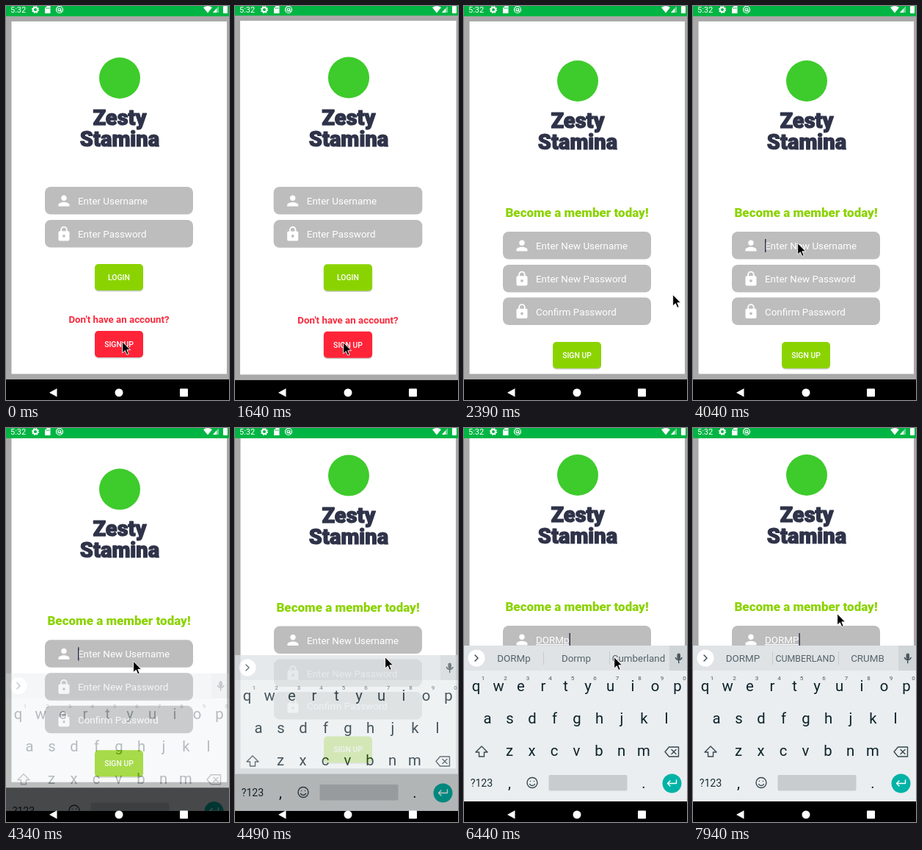
An HTML page that plays this animation: 304 px wide and 536 px high, repeating every 8000 ms.

```html
<!DOCTYPE html>
<html lang="en">
<head>
<meta charset="utf-8">
<title>Sign up</title>
<style>
html, body { margin: 0; width: 100%; height: 100%; overflow: hidden; background: #000; }
svg { display: block; width: 304px; height: 536px; font-family: Roboto, sans-serif; }
.mid { text-anchor: middle; }
.brand { font-weight: 900; font-size: 29px; fill: #2f3349; stroke: #2f3349; stroke-width: 1.2; stroke-linejoin: round; }
.hint { font-size: 13.4px; fill: #fff; }
.btn { font-size: 10.4px; font-weight: 500; fill: #fff; }
.key { font-size: 20.3px; fill: #0c2129; }
.num { font-size: 8px; fill: #4b575d; }
.word { font-size: 13.4px; fill: #55636a; }
.line { fill: none; stroke: #37474f; stroke-width: 1.4; stroke-linejoin: round; stroke-linecap: round; }
#typed { text-decoration: underline; }
</style>
</head>
<body>
<svg viewBox="0 0 304 536">
  <defs>
    <clipPath id="aboveNav"><path d="M0 0H304V521H0z"/></clipPath>
    <path id="person" fill="#fff" d="M12 12c2.2 0 4-1.8 4-4s-1.8-4-4-4-4 1.8-4 4 1.8 4 4 4zm0 2c-2.7 0-8 1.3-8 4v2h16v-2c0-2.7-5.3-4-8-4z"/>
    <path id="lock" fill="#fff" fill-rule="evenodd" d="M18 8h-1V6A5 5 0 0 0 7 6v2H6a2 2 0 0 0-2 2v10a2 2 0 0 0 2 2h12a2 2 0 0 0 2-2V10a2 2 0 0 0-2-2zm-6 9a2 2 0 1 1 0-4 2 2 0 0 1 0 4zm3-9H9V6a3 3 0 0 1 6 0z"/>
  </defs>

  <rect width="304" height="536"/>
  <rect width="304" height="14" fill="#00b544"/>
  <g id="login"></g>
  <g id="signup"></g>
  <g clip-path="url(#aboveNav)"><g id="keyboard"></g></g>

  <rect id="bar" width="304" height="14" fill="#00b544"/>
  <g fill="#fff">
    <text x="6" y="9" font-size="11">5:32</text>
    <circle cx="40" cy="5" r="3" fill="none" stroke="#fff" stroke-width="2"/>
    <circle cx="40" cy="5" r="4.4" fill="none" stroke="#fff" stroke-width="1.4" stroke-dasharray="1.8 1.65"/>
    <path d="M53 3l3-3h4.5V10H53z"/>
    <path d="M55.5 2v2M57.2 2v2M59 2v2" stroke="#00b544" stroke-width=".8"/>
    <circle cx="73" cy="5" r="4.5" fill="none" stroke="#fff" stroke-width="1.2"/>
    <circle cx="73" cy="5" r="2" fill="none" stroke="#fff" stroke-width="1.2"/>
    <path d="M73 5l3 3" stroke="#fff" stroke-width="1.2"/>
    <path d="M269 2Q275-2 281 2L275 9.5z"/>
    <path d="M290 0V9H282z" fill-opacity=".45"/>
    <path d="M287 3.5V9H282z"/>
    <rect x="296" width="6" height="10" rx="1"/>
    <path d="M59 526l10.500-5.700v11.400z"/>
    <circle cx="154" cy="526" r="5.500"/>
    <rect x="237" y="520.500" width="11" height="11" rx="1"/>
  </g>
  <path id="cursor" d="M.7 .7V16L4.300 12.700 6.800 18.400 9.200 17.400 6.800 11.800H11.500z" stroke="#fff" stroke-width=".9"/>
</svg>

<script>
const $ = id => document.getElementById(id);
const text = (x, y, cls, s, more = '') => `<text x="${x}" y="${y}" class="${cls}" ${more}>${s}</text>`;
const rect = (x, y, w, h, r, fill) => `<rect x="${x}" y="${y}" width="${w}" height="${h}" rx="${r}" fill="${fill}"/>`;
const icon = (id, x, y) => `<use href="#${id}" transform="translate(${x - 11.3} ${y - 11.3}) scale(.94)"/>`;

const page = body => rect(0, 14, 304, 494, 0, '#a9a9a9') + rect(7.5, 21, 293.5, 479.5, 0, '#fff') + body;
const brand = dy => `<circle cx="155" cy="${98 + dy}" r="28" fill="#3ecb2c"/>` +
  text(155, 162 + dy, 'brand mid', 'Zesty') + text(155, 191 + dy, 'brand mid', 'Stamina');
const field = (y, pic, hint, more) => rect(53, y, 202, 37.5, 8, '#bdbdbd') +
  icon(pic, 79, y + 19) + text(98, y + 24, 'hint', hint, more);
const button = (y, fill, label) => rect(121, y + 1.5, 66, 36, 5, '#0003') + rect(121, y, 66, 36, 5, fill) +
  text(154, y + 21.8, 'btn mid', label);

$('login').innerHTML = page(
  brand(0) + field(246, 'person', 'Enter Username') + field(291, 'lock', 'Enter Password') +
  button(351, '#8bd300', 'LOGIN') +
  text(154, 431, 'mid', "Don't have an account?", 'font-size="13.3" font-weight="700" fill="#f9293c"') +
  button(442, '#ff2438', 'SIGN UP'));

$('signup').innerHTML = page(
  brand(4) +
  text(154, 287, 'mid', 'Become a member today!', 'font-size="17" font-weight="900" fill="#8bd300"') +
  field(307, 'person', 'Enter New Username', 'id="userHint"') + field(352, 'lock', 'Enter New Password') +
  field(396.5, 'lock', 'Confirm Password') + button(457, '#8bd300', 'SIGN UP') +
  text(98, 331, 'hint', '', 'id="typed"') + '<rect id="caret" y="317" width="1.5" height="18" fill="#30344e"/>');

const row = (letters, x, y) => [...letters].map((c, i) => text(x + 30.5 * i, y, 'key mid', c)).join('');
$('keyboard').innerHTML =
  rect(0, 296, 304, 212, 0, '#eaeef0') + rect(0, 296, 304, 34, 0, '#dfe3e6') + rect(280, 296, 24, 34, 0, '#d0d5d8') +
  '<circle cx="17" cy="313" r="11.5" fill="#fff"/><path id="chevron" class="line"/>' +
  '<path id="dividers" d="M108.5 304v18M198.5 304v18" stroke="#c5cacd"/>' +
  [68, 153, 238].map(x => text(x, 318, 'word mid', '')).join('') +
  rect(290.5, 306.5, 4.5, 8.5, 2.2, '#4b575d') + '<path class="line" d="M288.500 312.500a4.500 4.500 0 0 0 8.500 0M292.700 317v2.500"/>' +
  row('qwertyuiop', 16.5, 358) + row('asdfghjkl', 32, 402) + row('zxcvbnm', 62, 446) +
  [...'1234567890'].map((c, i) => text(26 + 30.5 * i, 343, 'num mid', c)).join('') +
  '<path class="line" d="M24 433l-8 8h4.500v6h7v-6h4.500z"/>' +
  '<path class="line" d="M274 440.500l5.500-6.500h13v13h-13zM283 437.500l6 6M289 437.500l-6 6"/>' +
  text(24, 488, 'mid', '?123', 'font-size="14.2" fill="#1c2f37"') +
  text(62, 490, 'key mid', ',') + text(245, 490, 'key mid', '.') +
  '<circle class="line" cx="93" cy="482.500" r="7"/><path class="line" d="M89.500 484.500a4 4 0 0 0 7 0M90.500 480.500v.1M95.500 480.500v.1"/>' +
  rect(115.5, 472, 107, 21.5, 2, '#c8cccf') +
  '<circle cx="283.500" cy="483.500" r="13" fill="#00b3a6"/>' +
  '<path class="line" style="stroke:#fff" d="M289.500 479v4.500h-12M281 480l-3.500 3.500 3.500 3.500"/>';

const LOOP = 8000, TICK = 150;
const pointer = [[590, 158, 456], [890, 147, 457], [1940, 147, 457], [2390, 284, 392], [2540, 262, 384],
  [2690, 260, 384], [2840, 260, 384], [3740, 142, 322], [4190, 142, 322], [4490, 204, 311], [6740, 204, 311],
  [6890, 203, 340], [7040, 202, 409], [7340, 199, 350], [7640, 196, 252]];
const rise = [[4190, 0], [4340, .3], [4490, .76], [4640, 1]];
const pan = [[4190, 0], [4490, 37.4], [4640, 38]];
const caretOn = [[0, 0], [4040, 1], [4490, 0], [4940, 1], [5390, 0], [5690, 1], [6890, 0], [7340, 1]];
const typing = [[0, ''], [5690, 'D'], [5840, 'DO'], [5990, 'DOR'], [6290, 'DORM'], [6440, 'DORMp'], [7340, 'DORM'], [7940, 'DORMP']];
const guesses = {
  D: ['Do', 'Day'], DO: ['Do', 'Don'], DOR: ['Dor', 'Door'], DORM: ['Dorm', 'Dorms'],
  DORMp: ['Dormp', 'Cumberland'], DORMP: ['CUMBERLAND', 'CRUMB']
};

const clamp = v => Math.max(0, Math.min(1, v));
const latest = (list, t) => list.filter(e => e[0] <= t).pop()?.[1] ?? list[0][1];
function track(list, t) {
  const i = list.findIndex(p => p[0] > t);
  if (i < 1) return (i ? list[list.length - 1] : list[0]).slice(1);
  const a = list[i - 1], b = list[i], k = (t - a[0]) / (b[0] - a[0]);
  return a.slice(1).map((v, n) => v + (b[n + 1] - v) * k);
}
const zoom = s => `translate(152 261) scale(${s}) translate(-152 -261)`;
const set = (el, name, v) => el.setAttribute(name, v);
const show = (el, on) => set(el, 'visibility', on ? 'visible' : 'hidden');
const words = document.querySelectorAll('.word');

function draw(now) {
  const t = Math.floor((now % LOOP - 140) / TICK) * TICK + 140;

  const p = t < 1640 ? 0 : clamp((t - 1610) / 400);
  const [k] = track(rise, t), [dy] = track(pan, t);
  show($('login'), p < 1);
  show($('bar'), p === 0 || p === 1);
  set($('login'), 'transform', zoom(1 + .05 * p));
  set($('signup'), 'transform', `translate(0 ${-dy}) ${zoom(1 - .15 * (1 - p) ** 2)}`);
  set($('signup'), 'opacity', clamp((p - .08) / .6));

  set($('keyboard'), 'opacity', k);
  set($('keyboard'), 'transform', `translate(0 ${54 * (1 - k)})`);

  const typed = latest(typing, t);
  $('typed').textContent = typed;
  show($('userHint'), !typed);
  show($('caret'), latest(caretOn, t));
  set($('caret'), 'x', 98 + (typed && $('typed').getComputedTextLength()));
  [typed, ...(guesses[typed] || ['', ''])].forEach((w, i) => {
    words[i].textContent = w;
    words[i].style.fontSize = w === 'CUMBERLAND' ? '12.4px' : '';
  });
  show($('dividers'), typed);
  set($('chevron'), 'd', k === 1 && !typed ? 'M19 309l-4 4 4 4' : 'M15 309l4 4-4 4');

  set($('cursor'), 'transform', `translate(${track(pointer, t)})`);
}

const start = performance.now();
function loop() {
  draw(performance.now() - start);
  requestAnimationFrame(loop);
}
loop();
</script>
</body>
</html>
```
